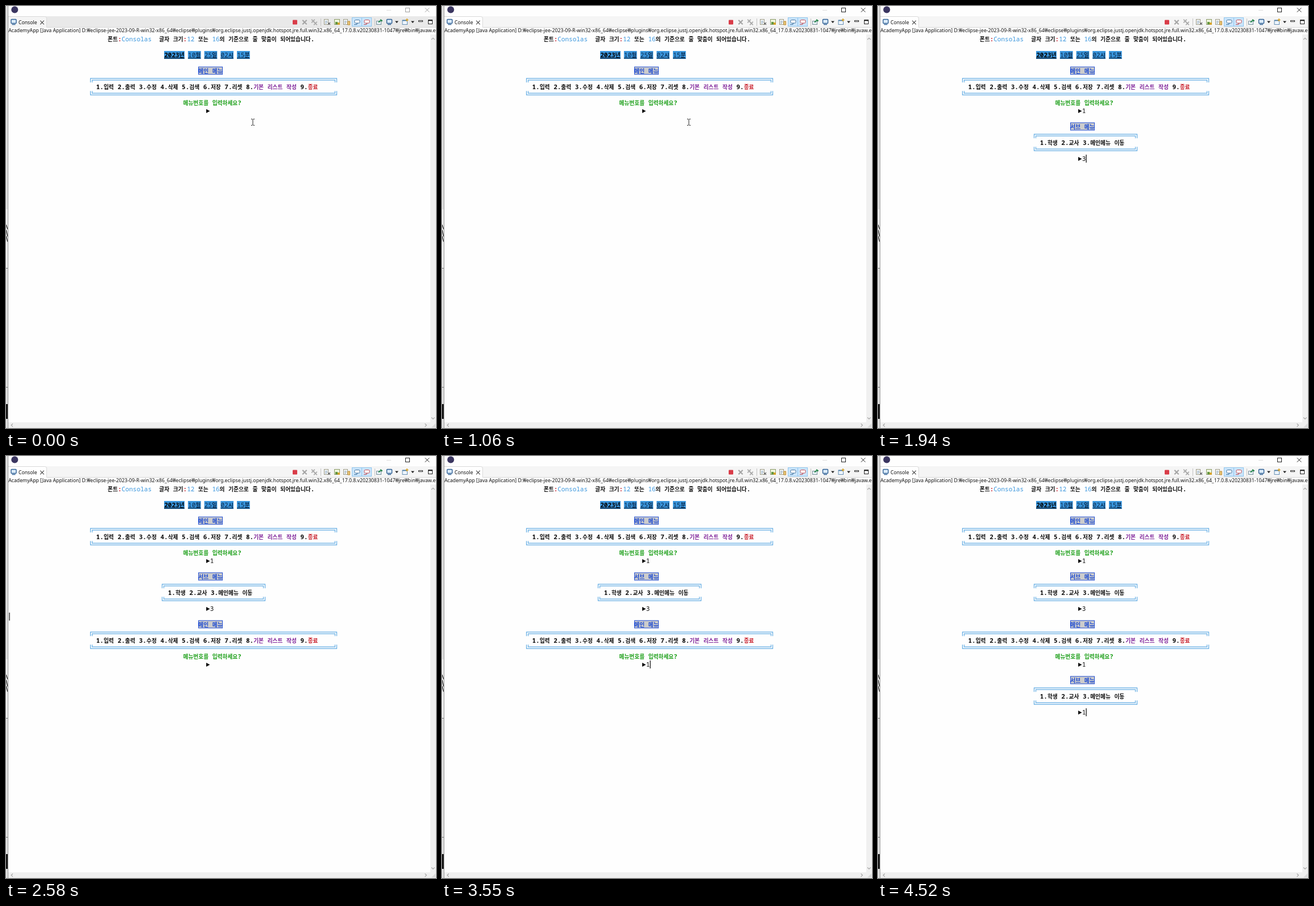
Write an HTML page that moves like this. It is 756 px wide and 741 px high and loops after 4.55 s.

```html
<!DOCTYPE html>
<html lang="ko">
<head>
<meta charset="utf-8">
<title>Console</title>
<style>
html, body { margin: 0; width: 100%; height: 100%; overflow: hidden; background: #fff; }
svg { display: block; width: 756px; height: 741px; }
text { white-space: pre; font: 11px "Noto Sans Mono", monospace; }
.ui { font: 8.7px "Noto Sans", "Noto Sans CJK KR", sans-serif; }
.ko { font-family: "Noto Sans CJK KR", "Noto Sans CJK", sans-serif; font-size: 9.7px; font-weight: 700; }
.b { font-weight: 700; }
</style>
</head>
<body>
<svg id="stage" viewBox="0 0 756 741"></svg>
<script>
const LOOP = 4550, FOCUS = 150;
const C = { ink: '#0c0c0c', cyan: '#3a96dd', blue: '#1a48d2', green: '#1c9f18', purple: '#7f2399', red: '#c81f2b' };
const stage = document.getElementById('stage');

const rect = (x, y, w, h, fill, extra = '') => `<rect x="${x}" y="${y}" width="${w}" height="${h}" fill="${fill}" ${extra}/>`;
const line = (d, color, w = 1, extra = '') => `<path d="${d}" fill="none" stroke="${color}" stroke-width="${w}" ${extra}/>`;
const fill = (d, color) => `<path d="${d}" fill="${color}"/>`;

// Hangul uses its own face; each part is [text, colour, bold].
const span = ([s, color = C.ink, bold = true]) => s.replace(/[가-힣]+|[^가-힣]+/g, t =>
  `<tspan fill="${color}" class="${/[가-힣]/.test(t) ? 'ko' : bold ? 'b' : ''}">${t}</tspan>`);
const row = (x, y, ...parts) => `<text x="${x}" y="${y}">${parts.map(span).join('')}</text>`;
const label = (x, y, s) => `<text class="ui" x="${x}" y="${y}" fill="#111">${s}</text>`;

// Double-line box: only the corners have short legs.
function frame(x1, x2, y) {
  const bars = [0, 3].map(i =>
    `M${x1 + i} ${y + 7}V${y + i}H${x2 - i}V${y + 7}` +
    `M${x1 + i} ${y + 22}V${y + 29 - i}H${x2 - i}V${y + 22}`).join('');
  return line(bars, C.cyan, 1.2, 'opacity=".8"');
}
const heading = (y, s) =>
  rect(338.5, y - 10.5, 42, 13, '#cccccc', `stroke="${C.blue}"`) + row(338.3, y, [s, C.blue]);
const prompt = y => fill(`M352 ${y - 7}L358.5 ${y - 3.5}L352 ${y}Z`, C.ink);

const mainMenu = y => heading(y, '메인 메뉴') + frame(148.5, 581.5, y + 9.7) +
  row(158.5, y + 28, ['1.입력 2.출력 3.수정 4.삭제 5.검색 6.저장 7.리셋 8.'],
    ['기본 리스트 작성', C.purple], [' 9.'], ['종료', C.red]) +
  row(311.5, y + 56, ['메뉴번호를 입력하세요?', C.green]) + prompt(y + 70.5);
const subMenu = y => heading(y, '서브 메뉴') + frame(274.5, 455.5, y + 9.7) +
  row(284.7, y + 28, ['1.학생 2.교사 3.메인메뉴 이동']) + prompt(y + 56.5);
const typed = (y, s) => row(358.7, y, [s, C.ink, false]);

function dateRow() {
  let x = 278, out = '';
  ['2023년', '10월', '25일', '02시', '15분'].forEach((s, i) => {
    const w = (s.length - 1) * 6.6 + 8.9;
    out += rect(x, 79, w + .6, 14, C.cyan) +
      row(x + .2, 89.5, [s, i ? '#0b2a4c' : '#000', !i]) +
      line(`M${x} 91.5H${x + w + .4}`, '#0b1d33', i ? 1 : 1.5);
    x += w + 6.6;
  });
  return out;
}

const monitor = (x, y) => rect(x - 4.5, y - 4.5, 9, 7, '#dcecfb', 'rx="1" stroke="#2f6095" stroke-width="1.4"') +
  line(`M${x - 3} ${y + 4.5}H${x + 3}`, '#2f6095', 1.4);
const page = x => rect(x - 4.5, 23.5, 7, 9, '#fbfbf5', 'stroke="#9a9a88"') +
  line(`M${x - 3} 26.5h4m-4 2h4m-4 2h3`, '#6f91b8', .8);
const cross = (x, y, r, color, w) => line(`M${x - r} ${y - r}l${2 * r} ${2 * r}m0 ${-2 * r}l${-2 * r} ${2 * r}`, color, w);
const drop = x => fill(`M${x - 3} 26.5h6l-3 3.5z`, '#222');
const bubble = (x, color) => rect(x - 8.5, 20.5, 17, 15, '#cce6fb', 'stroke="#8ec5ee"') +
  rect(x - 4, 24.5, 9, 5.5, '#fff', `rx="1.5" stroke="${color}"`) +
  line(`M${x - 5} 32.5h4l2-2`, color, 1.2);

function toolbar() {
  return rect(504, 24.5, 8, 8, '#d93c48', 'rx="1"') +
    cross(525, 28.5, 3.7, '#a5a5a5', 2.2) +
    cross(540, 26.5, 2.8, '#aaa', 1.7) + cross(544, 30.5, 2.8, '#aaa', 1.7) +
    line('M553.5 22V35M648.5 22V35', '#c4c4c4') +
    page(564) + cross(568, 31, 2, '#666', 1.3) +
    rect(577.5, 23.5, 9, 9, '#eef5dd', 'stroke="#8c9a68"') + rect(579, 28, 4, 4, '#63973f') + rect(583, 29, 4, 4, '#d5a52d') +
    page(598) + rect(601, 27, 3.5, 6, '#f2d083', 'stroke="#b98930"') +
    bubble(617, '#41729e') + bubble(634, '#c04c55') +
    rect(651.5, 26.5, 8, 6, '#e7f0f5', 'stroke="#78909c"') + line('M655 28.5l3-2.5m0-2l3.5 2.5', '#26884b', 2.2) +
    monitor(674, 28) + drop(687) +
    rect(697, 25, 8.5, 7.5, '#edf5fd', 'stroke="#678fb2"') + line('M697 25.5h8', '#4c7ca7', 1.6) +
    line('M705 22v5m-2.5-2.5h5', '#d6a126', 1.6) + drop(715) +
    rect(725.5, 25.5, 7, 2, '#fff', 'stroke="#333"') +
    rect(742.5, 24.5, 7, 7, '#fff', 'stroke="#222"') + line('M742 25.5h8', '#222', 1.5);
}

// Title buttons, tab and toolbar; paler buttons and a greyer strip without focus.
function header(active) {
  const button = active ? '#222' : '#a0a0a0';
  return line('M669 7.5h8', '#ddd') + rect(702.5, 3.5, 7, 7, 'none', `stroke="${button}"`) +
    cross(740.5, 7, 3.7, button, 1) +
    rect(4, 18, 752, 19, active ? '#f5f5f5' : '#e9e9e9') + rect(4, 19, 67, 19, active ? '#fff' : '#f5f5f5') +
    line('M4 18.5H68.5Q71.5 18.5 71.5 22V37.5H756', '#d9d9d9') +
    monitor(13.5, 28) + label(22, 31.5, 'Console') + cross(63.5, 29, 3.3, '#444', 1.1) + toolbar();
}

function chrome() {
  const path = 'D:₩eclipse-jee-2023-09-R-win32-x86_64₩eclipse₩plugins₩org.eclipse.justj.openjdk.hotspot.jre.full.win32.x86_64_17.0.8.v20230831-1047₩jre₩bin₩javaw.e';
  return rect(0, 0, 756, 741, '#fefefe') +
    rect(0, 0, 3, 741, '#e4e4e4') + rect(0, 357, 3, 103, '#f4f4f4') +
    line('M0 384L3 392M0 393L3 405M0 404L3 414', '#222', 1.2) +
    line('M0 460.5H3M0 669.5H3', '#777') + rect(0, 699, 3, 26, '#181818') +
    line('M3.5 0V741', '#8c8c8c') +
    '<circle cx="15.3" cy="6.5" r="6" fill="#3a3560"/>' +
    label(4.2, 46.3, 'AcademyApp [Java Application]') + label(133.5, 46.3, path) +
    rect(746, 50, 10, 681, '#f0f0f0') + rect(4, 731, 752, 10, '#f0f0f0') +
    line('M748 59l2.8-2.8 2.8 2.8M748 722.5l2.8 2.8 2.8-2.8M12 733.3l-2.8 2.8 2.8 2.8M736.5 733.3l2.8 2.8-2.8 2.8', '#a0a0a0', 1.1) +
    fill('M755 733v7h-7z', '#dadada');
}

const intro = row(178.8, 61.5, ['폰트'], [':', C.red], ['Consolas', C.cyan, false], ['  글자 크기'],
  [':', C.red], ['12', C.cyan, false], [' 또는 '], ['16', C.cyan, false], ['의 기준으로 줄 맞춤이 되어있습니다.']);
const pointer = line('M431 198.5h2l1 1 1-1h2M434 199.5v9M431 209.5h2l1-1 1 1h2', '#222');

// Parts that come and go: [markup, from, to]
const parts = [
  [header(false), 0, FOCUS],
  [header(true), FOCUS, LOOP],
  [pointer, 0, 1180],
  [typed(187.5, '1'), 1180, LOOP],
  [subMenu(215.5), 1340, LOOP],
  [typed(271.5, '3'), 1850, LOOP],
  [mainMenu(299.5), 2560, LOOP],
  [typed(369.7, '1'), 3400, LOOP],
  [subMenu(397.5), 3680, LOOP],
  [typed(453.5, '1'), 4250, LOOP]
];
// Caret: [time, x, y], off when x is missing
const caretSteps = [
  [0], [FOCUS, 359, 184], [680], [1180, 366, 184], [1340, 6, 198],
  [1700, 359, 268], [1850, 366, 268], [2380], [2560, 6, 282],
  [3090, 359, 366], [3400, 366, 366], [3680, 6, 380],
  [4050, 359, 450], [4250, 366, 450]
];

stage.innerHTML = chrome() + intro + dateRow() + mainMenu(117.5) +
  parts.map(p => `<g class="part">${p[0]}</g>`).join('') +
  '<path id="caret" d="M0 -7V7" stroke="#000" stroke-width="1.2"/>';
const groups = stage.querySelectorAll('.part');
const caret = document.getElementById('caret');

function draw() {
  const t = performance.now() % LOOP;
  parts.forEach(([, from, to], i) => {
    groups[i].style.display = t >= from && t < to ? '' : 'none';
  });
  const [, x, y] = caretSteps.filter(s => s[0] <= t).pop();
  caret.style.display = x ? '' : 'none';
  if (x) caret.setAttribute('transform', `translate(${x + .1} ${y})`);
  requestAnimationFrame(draw);
}
draw();
</script>
</body>
</html>
```
